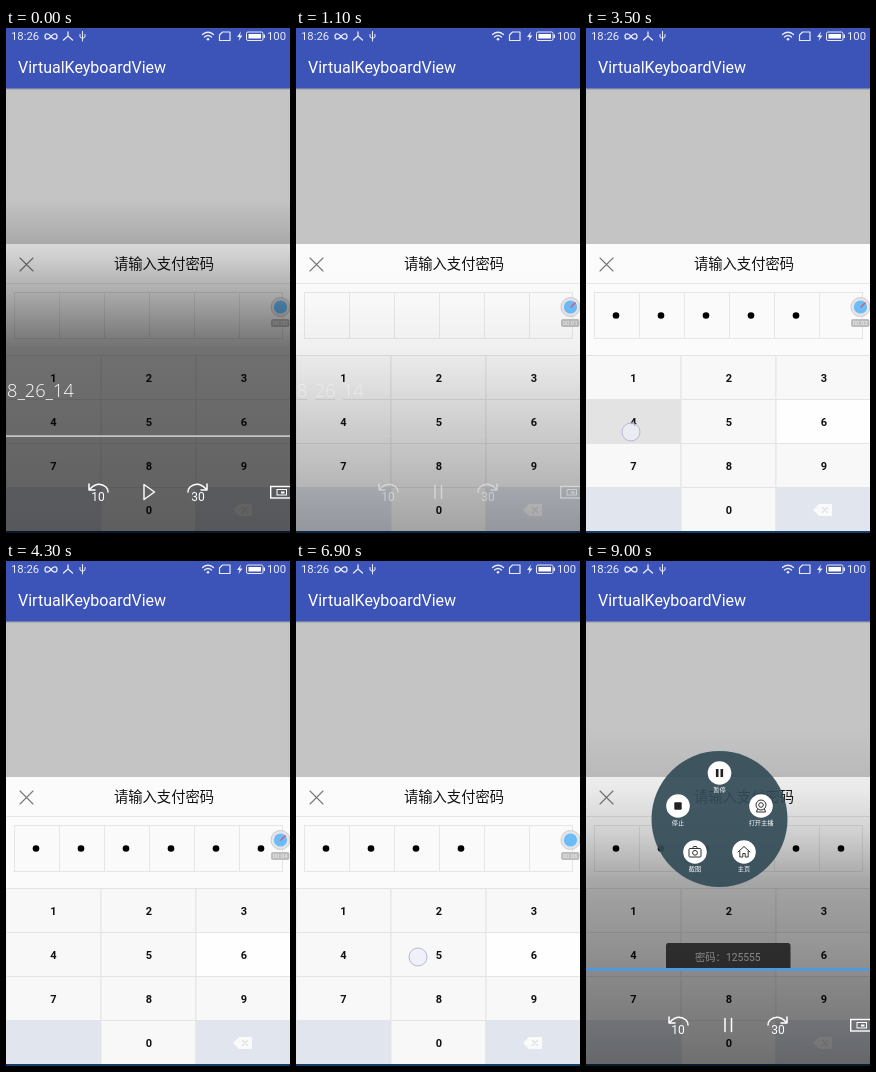
Recreate the animation shown at these times as an HTML page. Size 284x505 px, loop 9100 ms.

```html
<!DOCTYPE html>
<html lang="zh">
<head>
<meta charset="utf-8">
<title>VirtualKeyboardView</title>
<style>
html, body { margin: 0; width: 100%; height: 100%; overflow: hidden; background: #c4c4c4; }
svg { display: block; width: 100%; height: 100%; }
text { font-family: Roboto, "Noto Sans CJK SC", "Noto Sans CJK", sans-serif; }
.mid { text-anchor: middle; }
.line { fill: none; stroke-linecap: round; stroke-linejoin: round; }
</style>
</head>
<body>
<svg id="stage" viewBox="0 0 284 505"></svg>
<script>
const LOOP = 9100, STEP = 100;
const stage = document.getElementById('stage');

// [start, end, x, y] of each finger mark
const touches = [
  [1400, 1700, 54, 344], [2200, 3000, 126, 363], [3100, 3300, 222, 394],
  [3400, 3800, 45, 404], [4000, 4300, 123, 406], [4900, 5500, 244, 490],
  [5700, 6300, 244, 490], [6600, 7100, 122, 396], [7100, 7500, 122, 396],
  [8400, 8700, 269, 288]
];
// [start, end, key index] of each pressed key
const presses = [
  [3100, 3200, 5], [3400, 3600, 3], [4000, 4200, 4], [4900, 5300, 11],
  [5700, 5800, 11], [5900, 6000, 11], [6100, 6200, 11],
  [6600, 6700, 4], [6800, 6900, 4], [7100, 7200, 4], [7300, 7400, 4]
];
// [time, number of dots]
const counts = [
  [0, 0], [3000, 3], [3100, 4], [3500, 5], [4000, 6], [4900, 5], [5700, 4],
  [5900, 3], [6100, 2], [6600, 3], [6800, 4], [7100, 5], [7300, 6]
];
const toasts = [[4400, 6400, '123645'], [7500, 9900, '125555']];

const clamp = v => Math.max(0, Math.min(1, v));
const during = (list, t) => list.filter(([a, b]) => t >= a && t < b);
const range = n => [...Array(n).keys()];

const rect = (x, y, w, h, fill, more = '') =>
  `<rect x="${x}" y="${y}" width="${w}" height="${h}" fill="${fill}" ${more}/>`;
const disc = (x, y, r, fill, more = '') =>
  `<circle cx="${x}" cy="${y}" r="${r}" fill="${fill}" ${more}/>`;
const text = (x, y, size, fill, s, more = '') =>
  `<text x="${x}" y="${y}" font-size="${size}" fill="${fill}" ${more}>${s}</text>`;
const line = (d, color, w = 1) =>
  `<path class="line" d="${d}" stroke="${color}" stroke-width="${w}"/>`;
const group = (opacity, s) => `<g opacity="${opacity}">${s}</g>`;
const MID = 'class="mid"';

function header() {
  return rect(0, 0, 284, 505, '#c4c4c4') + rect(0, 60, 284, 2, '#aeaeae') +
    rect(0, 0, 284, 60.5, '#3c53b8') +
    text(5, 12.3, 11.3, '#e8ebf8', '18:26') +
    line('M45 8.5C42 4.5 39 5.5 39 8.5S42 12.5 45 8.5 51 5.5 51 8.5 48 12.5 45 8.5', '#e8ebf8', 1.3) +
    line('M62 4V8L57.5 12M62 8L66.5 12', '#e8ebf8', 1.3) +
    line('M76.5 3.5V13M74 6.5V9L76.5 10.5L79 9V6.5', '#e8ebf8') +
    line('M196.5 6.5Q202 2 207.5 6.5M198.5 9Q202 6 205.5 9', '#e8ebf8', 1.3) +
    disc(202, 11.3, 1.3, '#e8ebf8') +
    line('M216.5 4H224V12.5H213.5V7Z', '#e8ebf8', 1.2) +
    '<path d="M235 3.5L231 9H233.5L232.5 13L236.5 7.5H234Z" fill="#e8ebf8"/>' +
    rect(240.5, 4, 16.5, 8.5, 'none', 'rx="1.5" stroke="#e8ebf8"') +
    rect(242.5, 6, 12.5, 4.5, '#fff') + rect(257.5, 6.5, 1.5, 3.5, '#e8ebf8') +
    text(261, 12.3, 11.3, '#e8ebf8', '100') +
    text(12, 45, 16, '#fff', 'VirtualKeyboardView');
}

function sheet() {
  return rect(0, 216, 284, 289, '#fbfbfb') +
    line('M14 230L27 243M27 230L14 243', '#777', 1.1) +
    text(158, 241.3, 14.3, '#111', '请输入支付密码', MID) +
    rect(0, 255, 284, 1, '#e6e6e6') +
    rect(8.5, 264.5, 268, 46, '#fafafa', 'stroke="#e6e6e6"') +
    range(5).map(i => rect(53 + 45 * i, 265, 1, 46, '#e6e6e6')).join('');
}

function keyFill(i, t) {
  const side = i === 9 || i === 11;
  if (during(presses, t).some(p => p[2] === i)) return side ? '#cdd2db' : '#e3e3e3';
  if (side) return '#e0e5ee';
  return i === 5 && t >= 3200 ? '#fefefe' : '#f8f8f8';
}

function keypad(t) {
  const labels = [1, 2, 3, 4, 5, 6, 7, 8, 9, '', 0, ''];
  const keys = labels.map((s, i) => {
    const x = i % 3 * 95, y = 327.5 + 44 * Math.floor(i / 3);
    return rect(x, y, 95, 44, keyFill(i, t), 'stroke="#e4e4e4"') +
      text(x + 47.3 + (i % 3 ? .5 : 0), y + 26.4, 11, '#111', s, MID + ' font-weight="700"');
  });
  return keys.join('') +
    '<path d="M227 482L233 476H246V488H233Z" fill="#fafafa"/>' +
    line('M236.5 479.5L241.5 484.5M241.5 479.5L236.5 484.5', '#dde1e9', 1.3) +
    rect(0, 503, 284, 2, '#123f6c');
}

function dots(t) {
  const n = counts.filter(c => c[0] <= t).pop()[1];
  return range(n).map(i => disc(30 + 45 * i, 287.5, 3.3, '#000')).join('');
}

function recorder(t) {
  if (t >= 8400) return '';
  const hand = t >= 1000 && t < 6400 ? line('M275 279L279 275', '#d0607c', 1.6) : '';
  return disc(274.5, 279, 9.5, '#e6e6e8', 'stroke="#ccc"') +
    disc(274.5, 279, 6.6, '#6cbcf8') + hand +
    rect(265, 291, 18.5, 8, '#bdbdbf', 'rx="2"') +
    text(274.2, 297.2, 6, '#f4f4f4', '00:0' + Math.floor(t / 1000), MID);
}

function toast(t) {
  return during(toasts, t).map(([a, b, code]) => {
    const shown = clamp(Math.min((t - a + 100) / 200, (b - t) / 300));
    return group(shown, rect(80, 382, 124.5, 27, '#4c4c4c', 'rx="2.5"') +
      text(109, 399.5, 10.3, '#eee', '密码：' + code));
  }).join('');
}

function finger(t) {
  return during(touches, t).map(([, , x, y]) =>
    disc(x, y, 9, '#eeeff8', 'fill-opacity=".75" stroke="#b4b9d2"')).join('');
}

function menu(t) {
  if (t < 8700) return '';
  const p = clamp((t - 8600) / 400);
  const icons = [
    [133.5, 212, '暂停', rect(-3.6, -4, 2.6, 8, '#222') + rect(1, -4, 2.6, 8, '#222')],
    [92, 245, '停止', rect(-3.7, -3.7, 7.4, 7.4, '#222', 'rx="1"')],
    [175, 245, '打开主播', disc(0, -1, 5, 'none', 'stroke="#333"') +
      disc(0, -1, 2.3, 'none', 'stroke="#333"') + line('M-3.5 3L-4.5 6H4.5L3.5 3', '#333')],
    [109, 291, '截图', rect(-6, -3.5, 12, 8.5, 'none', 'rx="1" stroke="#333"') +
      disc(0, .8, 2.4, 'none', 'stroke="#333"') + line('M-2.5 -3.5L-1.5 -5.5H1.5L2.5 -3.5', '#333')],
    [158, 291, '主页', line('M-6 0L0 -5.5L6 0M-4.2 -1V5H-1.2V1.5H1.2V5H4.2V-1', '#333')]
  ];
  const items = icons.map(([x, y, name, art]) =>
    `<g transform="translate(${x} ${y})">${disc(0, 0, 11.8, '#fff')}${art}` +
    text(0, 19, 6.2, '#fff', name, MID) + '</g>').join('');
  const x = 270 + (133.5 - 270) * p, y = 285 + (258 - 285) * p;
  return `<g transform="translate(${x} ${y}) scale(${p}) translate(-133.5 -258)">` +
    disc(133.5, 258, 68, '#344b57', 'fill-opacity=".92"') + items + '</g>';
}

// Player controls: the shade climbs from the bottom as it grows stronger
function player(t) {
  const ending = t >= 8400;
  const p = ending ? .15 + (t - 8300) / 1000 : clamp((1400 - t) / 700);
  if (p <= 0) return '';
  const shade = [[170, 0, 1], [230, .18, 5.5], [270, .34, 4.5], [320, .55, 3], [505, .62, .7]];
  const stops = shade.map(([y, a, k]) =>
    `<stop offset="${(y - 170) / 335}" stop-opacity="${a * p ** k}"/>`).join('');
  const play = ending ? 0 : clamp((400 - t) / 200);
  const bar = ending ? rect(0, 407, 284, 2.6, '#4a9be6') : rect(0, 407.3, 284, 1.6, '#ccc');
  const ui =
    (ending ? '' : text(1, 369, 18.2, '#fff', '8_26_14', 'style="font-family:\'Open Sans\',sans-serif" font-weight="300"')) +
    line('M83 456V462H89M83.5 461.5Q92 452.5 100 459Q102 461 102 464', '#fff', 1.5) +
    text(92, 473, 12, '#fff', '10', MID) +
    line('M201 456V462H195M200.5 461.5Q192 452.5 184 459Q182 461 182 464', '#fff', 1.5) +
    text(192, 473, 12, '#fff', '30', MID) +
    group(clamp(play), line('M138 456.5L148.5 464L138 471.5Z', '#fff', 1.4)) +
    group(1 - clamp(play), line('M139 457.5V470.5M145.5 457.5V470.5', '#fff', 1.5)) +
    rect(264.7, 458.5, 22, 11.5, 'none', 'stroke="#fff" stroke-width="1.4"') +
    rect(271, 461.5, 9.5, 5.5, 'none', 'stroke="#fff"') + rect(275, 463.5, 3.5, 2, '#fff');
  return `<linearGradient id="shade" x2="0" y2="1">${stops}</linearGradient>` +
    rect(0, 170, 284, 335, 'url(#shade)') +
    group(ending ? clamp(p * 1.8) : p, bar) + group(ending ? clamp(p * 1.3 - .1) : p, ui);
}

let last = -1;
function frame(now) {
  const t = Math.floor(now % LOOP / STEP) * STEP;
  if (t !== last) {
    last = t;
    const shaded = header() + sheet() + keypad(t) + dots(t) + recorder(t) + toast(t) + finger(t);
    stage.innerHTML = shaded + player(t) + menu(t);
  }
  requestAnimationFrame(frame);
}
frame(0);
</script>
</body>
</html>
```
